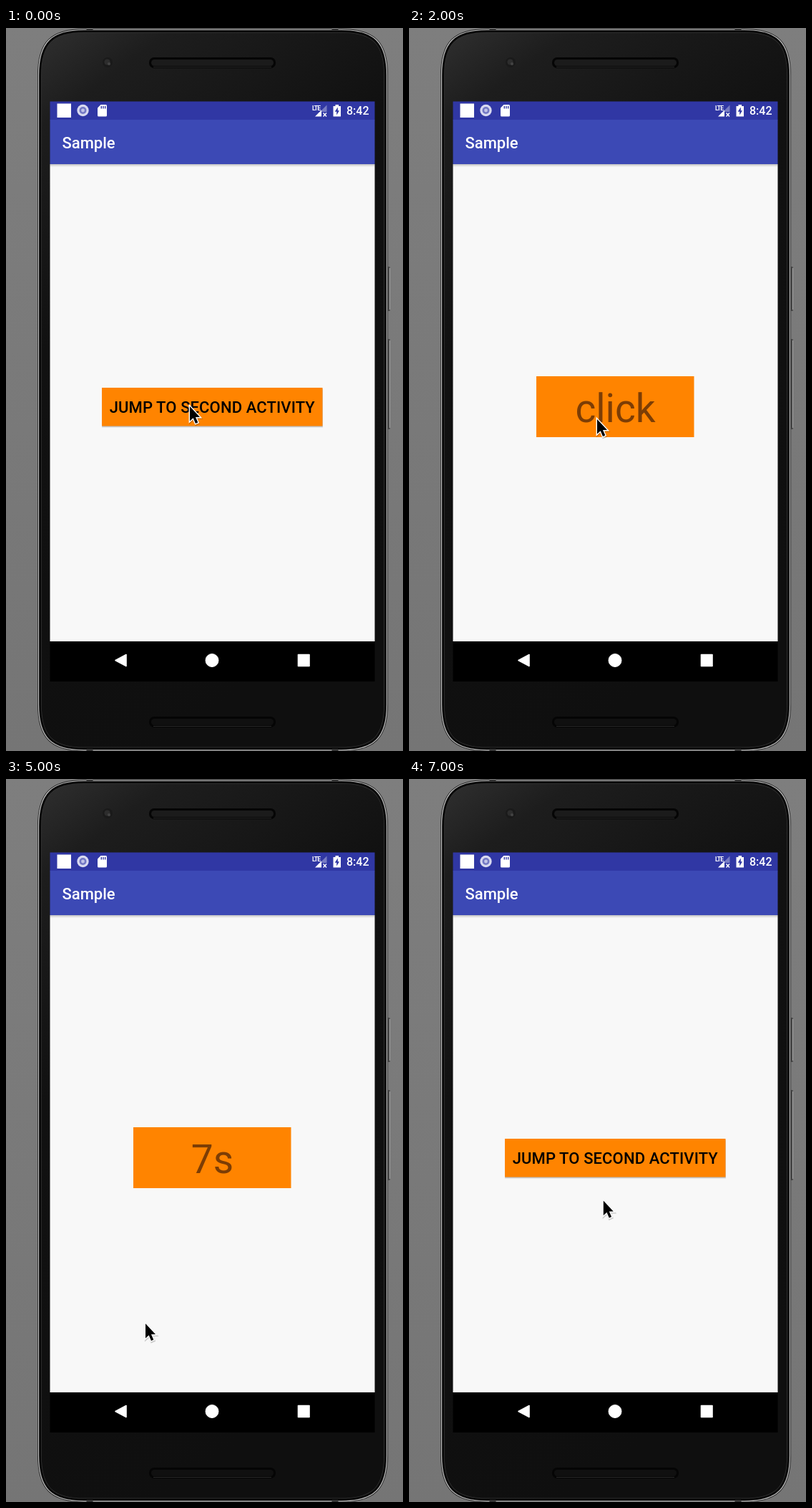
Write an HTML page that moves like this. It is 555 px wide and 1009 px high and loops after 8000 ms.

```html
<!DOCTYPE html>
<html lang="en">
<head>
<meta charset="utf-8">
<title>Countdown button</title>
<style>
  html, body { margin: 0; width: 100%; height: 100%; overflow: hidden; background: #7a7a7a; }
  svg { display: block; width: 555px; height: 1009px; }
  text { font-family: Roboto, sans-serif; }
  .medium { font-weight: 500; }
  .white { fill: #fff; }
</style>
</head>
<body>
<svg viewBox="0 0 555 1009">
  <defs>
    <linearGradient id="wall" x2="0" y2="1">
      <stop offset="0" stop-color="#7e7e7e"/>
      <stop offset="1" stop-color="#757575"/>
    </linearGradient>
    <linearGradient id="body" x1="0" y1="0" x2=".35" y2="1">
      <stop offset="0" stop-color="#303030"/>
      <stop offset=".12" stop-color="#1d1d1d"/>
      <stop offset=".4" stop-color="#111"/>
      <stop offset="1" stop-color="#0f0f0f"/>
    </linearGradient>
    <linearGradient id="shade" x2="0" y2="1">
      <stop offset="0" stop-color="#000" stop-opacity=".22"/>
      <stop offset="1" stop-color="#000" stop-opacity="0"/>
    </linearGradient>
    <path id="shell" d="M45.5 66C45.5 20 63 2.500 109 2.500H469C515 2.500 532.500 20 532.500 66
      V944C532.500 990 515 1007.800 469 1007.800H109C63 1007.800 45.500 990 45.500 944Z"/>
    <clipPath id="inside"><use href="#shell"/></clipPath>
    <g id="speaker">
      <rect x="200" width="177" height="15" rx="7" fill="#050505"/>
      <rect x="203" y="3" width="171" height="9" rx="4.5" fill="currentColor"/>
      <path d="M206 13.500H371" stroke="#2a2a2a"/>
    </g>
    <path id="arrow" d="M0 0V20.500L4.700 16.300L8 24L11.300 22.600L8 15H14Z"/>
  </defs>

  <rect width="555" height="1009" fill="url(#wall)"/>

  <!-- phone shell -->
  <g fill="#4c4c4c">
    <rect x="532" y="333" width="5" height="62" rx="1.5"/>
    <rect x="532" y="434" width="5" height="126" rx="1.5"/>
  </g>
  <path d="M536.500 335V393M536.500 436V558" stroke="#a2a2a2"/>
  <use href="#shell" fill="#232323" stroke="#232323" stroke-width="3"/>
  <g clip-path="url(#inside)" fill="none">
    <use href="#shell" fill="url(#body)"/>
    <use href="#shell" stroke="#343434" stroke-width="8.500"/>
    <use href="#shell" stroke="#080808" stroke-width="7"/>
  </g>
  <use href="#shell" fill="none" stroke="#c4c4c4" stroke-width="1.2"/>
  <path d="M117 1V4M460 1V4M117 1006V1009M460 1006V1009" stroke="#333" stroke-width="9"/>
  <use href="#speaker" y="41" color="#1b1b1b"/>
  <use href="#speaker" y="961" color="#101010"/>
  <circle cx="142" cy="48" r="7" fill="#1a1a1a"/>
  <circle cx="141.5" cy="47.5" r="4" fill="#2d2d2d"/>
  <circle cx="144" cy="50" r="2" fill="#444"/>

  <!-- screen -->
  <rect x="61.5" y="190" width="454" height="666" fill="#f8f8f8"/>
  <rect x="61.5" y="102.5" width="454" height="26" fill="#3037a4"/>
  <rect x="61.5" y="128" width="454" height="62" fill="#3c49b5"/>
  <rect x="61.5" y="190" width="454" height="4" fill="url(#shade)"/>
  <rect x="61.5" y="856" width="454" height="56"/>

  <!-- status bar -->
  <g class="white">
    <rect x="71.5" y="105.5" width="19.5" height="19.5"/>
    <circle cx="107.5" cy="115" r="8.2" fill="#d8d9f0"/>
    <circle cx="107.5" cy="115" r="5" fill="#7378c4"/>
    <circle cx="107.5" cy="115" r="2.4" fill="#c2c4e8"/>
    <path d="M132.5 107H139.5Q141 107 141 108.5V122Q141 123.5 139.5 123.5H129.5Q128 123.5 128 122V111.5Z"/>
    <path d="M133.3 109V112.5M136 109V112.5M138.7 109V112.5" stroke="#3037a4" stroke-width="1.4"/>
    <text x="428" y="115" font-size="8.5" font-weight="700" letter-spacing="-.9">LTE</text>
    <path d="M448.5 107.5V117H439Z" opacity=".35"/>
    <path d="M432 123.5L441 114.5V123.5Z"/>
    <path d="M443.5 118.5L448 123.5M448 118.5L443.5 123.5" stroke="#fff" stroke-width="1.4"/>
    <path d="M457.5 109H460.5V107H465V109H468V123.5H457.5Z"/>
    <path d="M463.8 110.5L459.7 116.8H462.2V121.5L466 115.2H463.8Z" fill="#3037a4"/>
    <text class="medium" x="476" y="121.3" font-size="16">8:42</text>
    <text class="medium" x="78.5" y="167.5" font-size="22">Sample</text>
  </g>

  <!-- navigation bar -->
  <g class="white" stroke="#fff" stroke-linejoin="round">
    <path d="M153 882.5L168 874.5V890.5Z" stroke-width="1.6"/>
    <circle cx="288" cy="882.5" r="9"/>
    <rect x="408.5" y="874.5" width="15.5" height="16" stroke-width="1.6"/>
  </g>

  <!-- two pages -->
  <g id="home">
    <rect x="134" y="504" width="309" height="53.5" opacity=".12"/>
    <rect x="134.5" y="503" width="308" height="53.5" opacity=".16"/>
    <rect x="134" y="502" width="308.5" height="53.5" fill="#ff8400"/>
    <text class="medium" x="288.3" y="537" font-size="22" letter-spacing=".12" text-anchor="middle">JUMP TO SECOND ACTIVITY</text>
  </g>
  <g id="timer">
    <rect x="178" y="486" width="220.5" height="85" fill="#ff8400"/>
    <text id="label" x="288.5" y="550" font-size="55" fill="#7c3d05" text-anchor="middle"></text>
  </g>

  <g id="pointer">
    <use href="#arrow" x=".6" y="1.2" fill="none" stroke="#000" stroke-opacity=".18" stroke-width="3.4"/>
    <use href="#arrow" stroke="#fff" stroke-width="2.8" paint-order="stroke"/>
  </g>
</svg>

<script>
  const LOOP = 8000, STEP = 1000;
  // pointer x, pointer y, timer label (empty on the home page)
  const steps = [
    [257, 528, ''],
    [260.8, 565, ''],
    [263, 546, 'click'],
    [263, 546, 'click'],
    [254.5, 628, '8s'],
    [195, 760, '7s'],
    [150.2, 864.5, '6s'],
    [271.8, 588.5, '']
  ];
  const el = id => document.getElementById(id);
  const show = (id, on) => el(id).setAttribute('visibility', on ? 'visible' : 'hidden');
  const start = performance.now();
  let last = -1;

  function draw(now) {
    const t = Math.max(0, now - start) % LOOP;
    const i = Math.floor(t / STEP);
    if (i !== last) {
      const [x, y, label] = steps[i];
      el('pointer').setAttribute('transform', `translate(${x} ${y})`);
      el('label').textContent = label;
      show('home', !label);
      show('timer', label);
      last = i;
    }
    requestAnimationFrame(draw);
  }
  draw(start);
</script>
</body>
</html>
```
